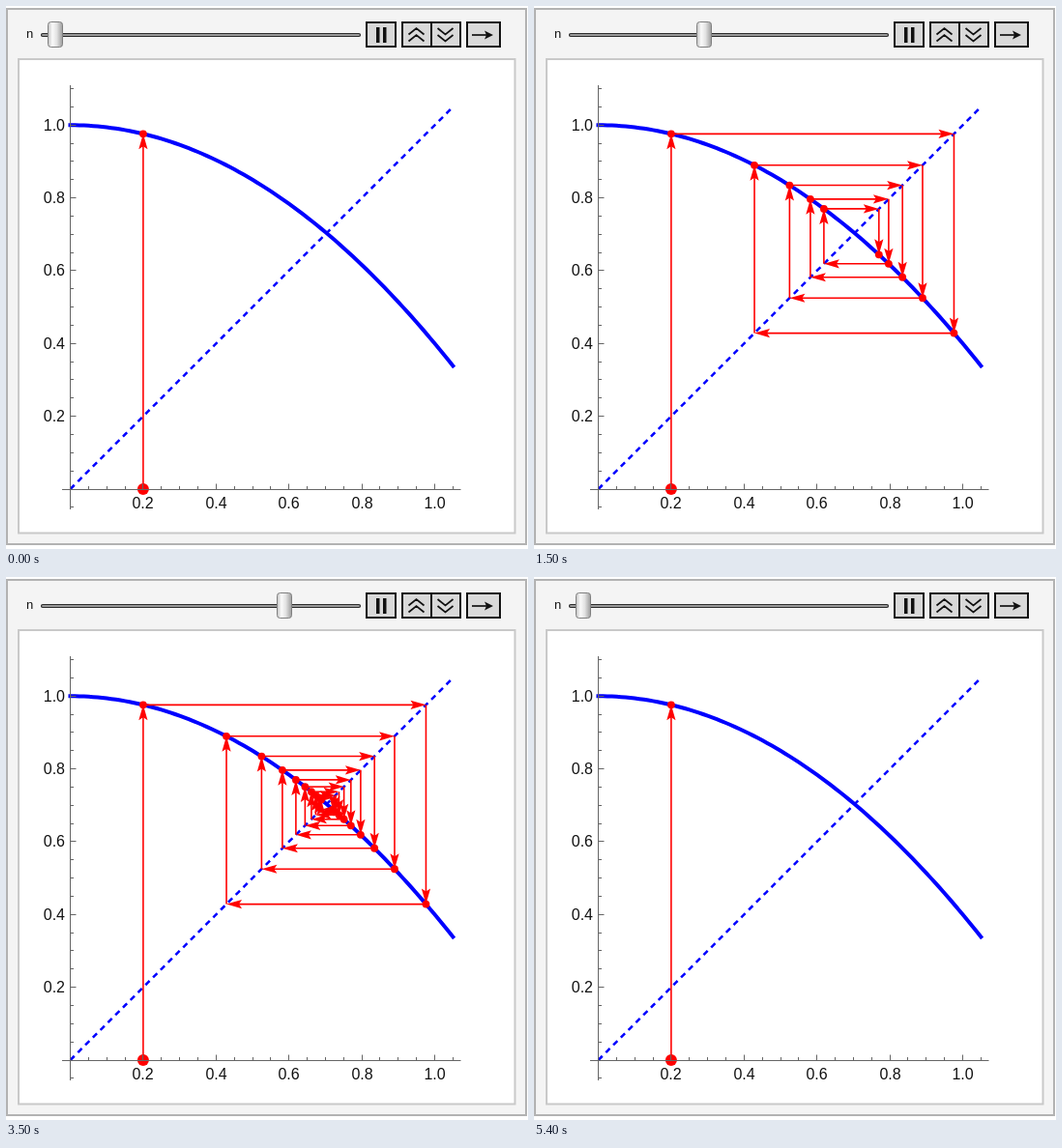
An HTML page for the animation above (6000 ms loop, 540x562 px).

```html
<!DOCTYPE html>
<html lang="en">
<head>
<meta charset="utf-8">
<title>Cobweb diagram</title>
<style>
  html, body { margin: 0; width: 100%; height: 100%; overflow: hidden; background: #fff; }
  svg { display: block; }
  text { font-family: "Liberation Sans", Arial, sans-serif; font-size: 16px; fill: #111; }
  .btn { fill: #d9d9d9; stroke: #111; stroke-width: 2; }
  .icon { fill: none; stroke: #111; stroke-width: 1.7; }
</style>
</head>
<body>
<svg width="540" height="562" viewBox="0 0 540 562">
  <defs>
    <linearGradient id="knob">
      <stop offset="0" stop-color="#c4c4c4"/>
      <stop offset=".3" stop-color="#fafafa"/>
      <stop offset=".6" stop-color="#e2e2e2"/>
      <stop offset="1" stop-color="#9c9c9c"/>
    </linearGradient>
  </defs>
  <rect x="1" y="3" width="537" height="554" fill="#f4f4f4" stroke="#b2b2b2" stroke-width="2"/>
  <rect x="13" y="55" width="513.5" height="490.5" fill="#fff" stroke="#c9c9c9" stroke-width="2"/>

  <text x="21" y="33" style="font-size:13px">n</text>
  <rect x="36.5" y="28.5" width="330" height="3" rx="1.5" fill="#999" stroke="#2c2c2c" stroke-width="1.2"/>
  <rect id="thumb" x="43.5" y="16.5" width="15" height="26" rx="3" fill="url(#knob)" stroke="#808080"/>

  <rect class="btn" x="373" y="17" width="30" height="25"/>
  <path d="M383 22h3.5v16H383zM390 22h3.5v16H390z" fill="#111"/>
  <rect class="btn" x="410" y="17" width="60" height="25"/>
  <path d="M440 17v25" stroke="#111" stroke-width="2"/>
  <path class="icon" d="M416.5 29.5l8-6.5 8 6.5M416.5 36.5l8-6.5 8 6.5M446.5 23l8 6.5 8-6.5M446.5 30l8 6.5 8-6.5"/>
  <rect class="btn" x="477" y="17" width="34" height="25"/>
  <path class="icon" d="M482 30h17"/>
  <path d="M504 30l-9-4.5 2 4.5-2 4.5z" fill="#111"/>

  <g id="plot"></g>
  <g id="arrows" stroke="#f00" stroke-width="1.6" fill="#f00"></g>
  <g id="dots" fill="#f00"></g>
  <g id="axes" stroke="#666" stroke-width="1"></g>
  <g id="labels"></g>
</svg>
<script>
const LAST = 24, STEP = 100, LOOP = 6000;
const $ = id => document.getElementById(id);
const f = x => 1 - 0.6 * x * x;
const px = x => 66.5 + 377 * x;
const py = y => 500 - 376.7 * y;

function add(parent, tag, attrs) {
  const el = document.createElementNS("http://www.w3.org/2000/svg", tag);
  for (const key in attrs) el.setAttribute(key, attrs[key]);
  return $(parent).appendChild(el);
}
const line = (parent, x1, y1, x2, y2) => add(parent, "path", { d: `M${x1} ${y1}L${x2} ${y2}` });
const dot = (x, y, r) => add("dots", "circle", { cx: px(x), cy: py(y), r });

function curve(fn, attrs) {
  const pts = [];
  for (let i = 0; i <= 84; i++) pts.push(`${px(i / 80)},${py(fn(i / 80))}`);
  add("plot", "polyline", { points: pts.join(" "), fill: "none", stroke: "#00f", ...attrs });
}

function arrow(x1, y1, x2, y2) {
  const [ax, ay, bx, by] = [px(x1), py(y1), px(x2), py(y2)];
  const angle = Math.atan2(by - ay, bx - ax) * 180 / Math.PI;
  const len = Math.hypot(bx - ax, by - ay);
  const g = add("arrows", "g", { transform: `translate(${bx} ${by}) rotate(${angle})` });
  g.innerHTML = `<path d="M${-len} 0H${-Math.min(len, 10)}"/>` +
    `<path stroke="none" d="M0 0L-16 -4.6L-13 0L-16 4.6Z"/>`;
  return g;
}

function drawAxes() {
  const cx = 66.5, cy = 500.5;
  line("axes", 58, cy, 470.5, cy);
  line("axes", cx, 82, cx, 521);
  const snap = v => Math.floor(v) + 0.5;
  for (let i = -1; i <= 22; i++) {
    const v = i / 20, major = i % 4 === 0, size = major ? 6 : 3.5;
    if (i === 0) continue;
    const x = snap(px(v)), y = snap(py(v));
    line("axes", cx, y, cx + size, y);
    if (i > 0 && i < 22) line("axes", x, cy, x, cy - size);
    if (!major) continue;
    const name = v.toFixed(1);
    add("labels", "text", { x: 61, y: y + 5.5, "text-anchor": "end" }).textContent = name;
    add("labels", "text", { x, y: 520, "text-anchor": "middle" }).textContent = name;
  }
}

curve(x => x, { "stroke-width": 2.5, "stroke-dasharray": "6 5" });
curve(f, { "stroke-width": 4, "stroke-linecap": "square" });
drawAxes();
dot(0.2, 0, 6);

// Each step holds the arrows and the dot of one iteration.
const steps = [];
for (let i = 0, x = 0.2, prev = 0; i < LAST; i++) {
  const parts = [];
  if (i) parts.push(arrow(prev, x, x, x));
  parts.push(arrow(x, i ? x : 0, x, f(x)), dot(x, f(x), 3.9));
  steps.push(parts);
  prev = x;
  x = f(x);
}

let shown = -1;
function draw(time) {
  const tick = Math.floor(time % LOOP / STEP);
  const n = Math.max(0, Math.min(tick - 5, 54 - tick, LAST));
  if (n !== shown) {
    shown = n;
    $("thumb").setAttribute("x", 43.5 + Math.floor(12.5 * n));
    steps.forEach((parts, i) => parts.forEach(el =>
      el.setAttribute("visibility", i < Math.max(n, 1) ? "visible" : "hidden")));
  }
}

const start = performance.now();
function loop() {
  draw(performance.now() - start);
  requestAnimationFrame(loop);
}
loop();
</script>
</body>
</html>
```
